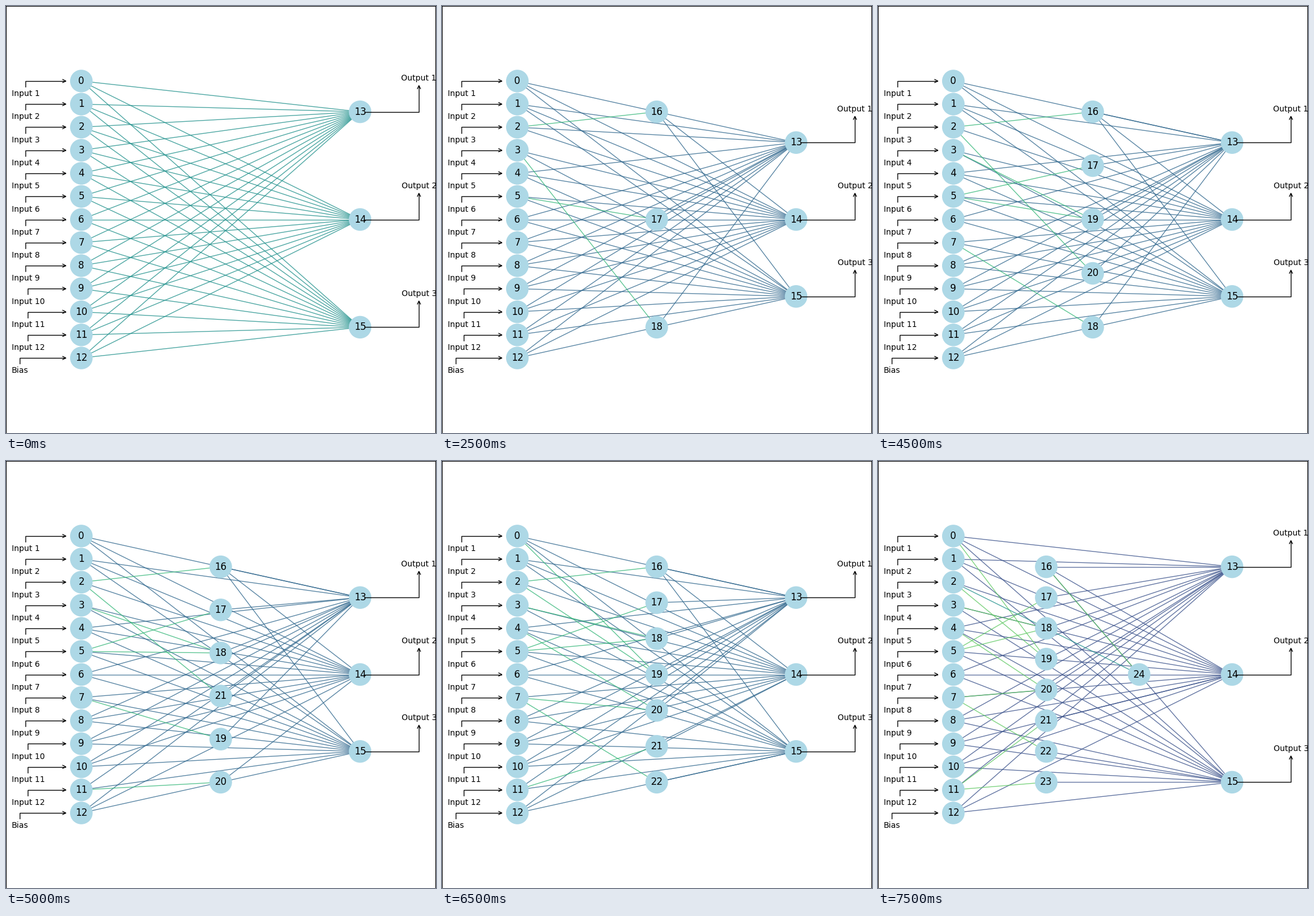
A matplotlib script for the animation above (8000 ms loop, 751 by 745 pixels).

```python
import numpy as np
import matplotlib.pyplot as plt
from matplotlib.animation import FuncAnimation
from matplotlib.patches import Circle, FancyArrowPatch

W, H, DPI = 751, 745, 100
CENTER_X, CENTER_Y = 375.0, 372.5
HALF_WIDTH, UNIT = 243.4, 53.69
INPUTS, OUTPUTS = range(13), range(13, 16)
FIRST_HIDDEN = 16

# Each step either links two nodes or splits a link with a new hidden node.
STEPS = [
    ("split", 2, 15), ("split", 5, 13), ("link", 16, 14), ("split", 3, 13),
    ("link", 5, 18), ("link", 16, 13), ("split", 2, 13), ("split", 7, 13),
    ("split", 11, 14), ("link", 0, 19), ("link", 4, 20), ("split", 7, 15),
    ("split", 11, 15), ("split", 2, 16),
]
# Captions from top to bottom where they differ from creation order.
CAPTIONS = {5: [16, 17, 19, 20, 18], 6: [16, 17, 18, 21, 19, 20]}

plt.rcParams["font.family"] = "DejaVu Sans"
fig = plt.figure(figsize=(W / DPI, H / DPI), dpi=DPI, facecolor="white")
ax = fig.add_axes([0, 0, 1, 1])
ax.set_xlim(0, W)
ax.set_ylim(H, 0)
ax.axis("off")
viridis = plt.get_cmap("viridis")


def build_network(step_count):
    """Return the links and the layer of every node after some steps."""
    links = [(i, o) for i in INPUTS for o in OUTPUTS]
    hidden = {}
    for kind, src, dst in STEPS[:step_count]:
        if kind == "link":
            links.append((src, dst))
            continue
        node = FIRST_HIDDEN + len(hidden)
        hidden[node] = hidden.get(dst, 0) + 1
        links.remove((src, dst))
        links += [(src, node), (node, dst)]
    last = max(hidden.values(), default=0) + 1
    layers = {i: 0 for i in INPUTS} | {o: last for o in OUTPUTS} | hidden
    return links, layers


def place_nodes(layers):
    last = max(layers.values())
    places = {}
    for layer in range(last + 1):
        members = [n for n in sorted(layers) if layers[n] == layer]
        reach = UNIT * (4.5 if layer == 0 else 3.5 if layer % 2 else 2.5)
        spread = np.linspace(-reach, reach, len(members)) if len(members) > 1 else [0]
        x = CENTER_X + HALF_WIDTH * (2 * layer / last - 1)
        places.update({n: (x, CENTER_Y + dy) for n, dy in zip(members, spread)})
    return places


def bent_arrow(start, tip, angle_a, angle_b):
    return ax.add_patch(FancyArrowPatch(
        start, tip, arrowstyle="->", mutation_scale=10, lw=1, color="black",
        shrinkA=0, shrinkB=0, zorder=4,
        connectionstyle=f"angle,angleA={angle_a},angleB={angle_b},rad=0"))


def draw_inputs(places):
    for i in INPUTS:
        y = places[i][1]
        name = "Bias" if i == INPUTS[-1] else f"Input {i + 1}"
        stem = 24.3 if name == "Bias" else 34.2 if i < 9 else 38.4
        ax.text(9.9, y + 26.3, name, fontsize=10, va="baseline")
        bent_arrow((stem, y + 10.1), (106, y), 90, 0)


moving = []


def draw(frame):
    while moving:
        moving.pop().remove()
    links, layers = build_network(max(0, frame - 1))
    places = place_nodes(layers)
    depth = max(layers.values()) + 1

    for src, dst in links:
        (x0, y0), (x1, y1) = places[src], places[dst]
        color = viridis((depth - layers[dst]) / depth)
        moving.extend(ax.plot([x0, x1], [y0, y1], color=color, alpha=0.8,
                              lw=1, zorder=1))

    hidden_count = len(places) - FIRST_HIDDEN
    captions = CAPTIONS.get(hidden_count, [])
    for node, (x, y) in places.items():
        rank = node - FIRST_HIDDEN
        caption = captions[rank] if captions and rank >= 0 else node
        moving.append(ax.add_patch(Circle((x, y), 19.7, fc="lightblue",
                                          ec="none", zorder=2)))
        moving.append(ax.text(x, y, str(caption), fontsize=12, ha="center",
                              va="center", zorder=3))

    for k, node in enumerate(OUTPUTS, 1):
        y = places[node][1]
        moving.append(bent_arrow((626, y), (721.2, y - 47.3), 0, 90))
        moving.append(ax.text(721.2, y - 54.3, f"Output {k}", fontsize=10,
                              ha="center", va="baseline"))
    return moving


ax.plot([0, 0, W - 1, W - 1], [H + 5, 0, 0, H + 5], color="black", lw=0.8)
draw_inputs(place_nodes(build_network(0)[1]))
anim = FuncAnimation(fig, draw, frames=len(STEPS) + 2, interval=500,
                     repeat=True, repeat_delay=0, blit=False)
plt.show()
```
